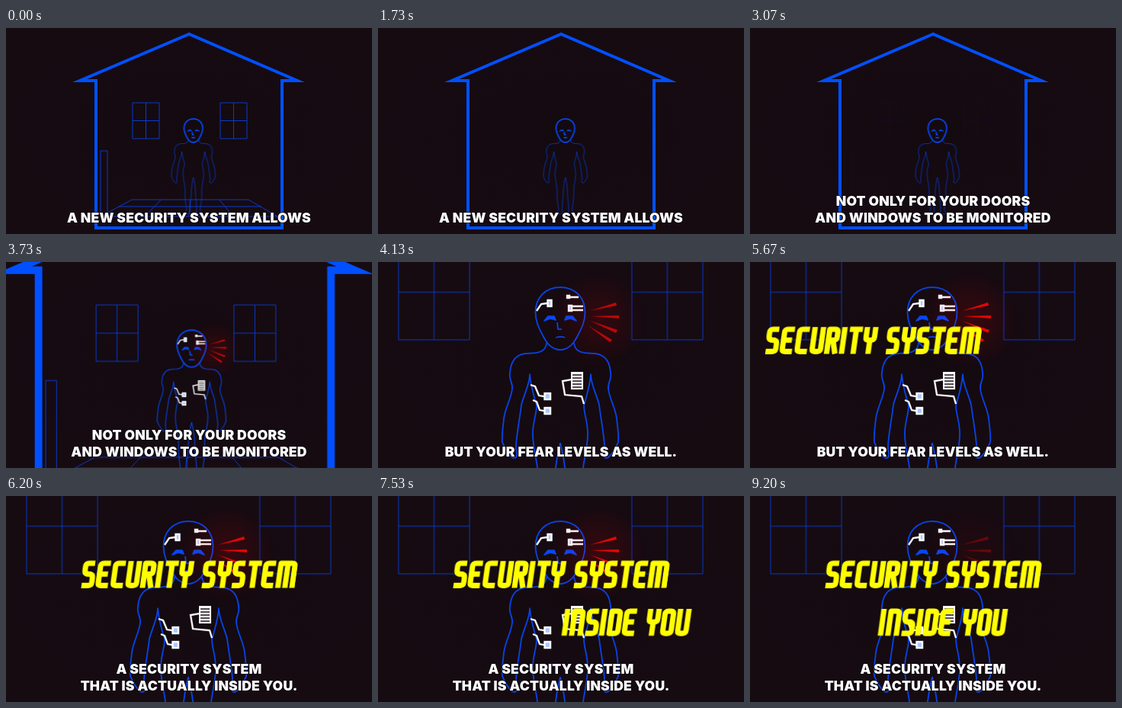
Animation, 480 px wide and 270 px high, one loop 9270 ms. Source, as an HTML page:

```html
<!DOCTYPE html>
<html lang="en">
<head>
<meta charset="utf-8">
<title>Security system</title>
<style>
  html, body { margin: 0; width: 100%; height: 100%; overflow: hidden; background: #160a12; }
  svg { display: block; width: 100%; height: 100%; }
  svg * { transform-origin: 0 0; }
  .line { fill: none; stroke: #0848f4; }
  .line * { vector-effect: non-scaling-stroke; }
  .house { stroke: #0050ff; stroke-width: 4; stroke-miterlimit: 8; }
  .room { stroke: #0a3fd4; stroke-width: .95; }
  .body { stroke-width: 1.75; stroke-linejoin: round; }
  .brow { fill: #0848f4; }
  .wire { fill: none; stroke: #fff; stroke-width: 2.3; }
  .chip { fill: #a9c8ff; stroke: #fff; stroke-width: 2.4; }
  .title { fill: none; stroke: #ff0; stroke-width: 7; stroke-linejoin: round; }
  .caption {
    font: 900 17.6px Inter, sans-serif; letter-spacing: .15px; text-anchor: middle; fill: #fff;
    stroke: #0b070c; stroke-width: 1.4px; paint-order: stroke; stroke-linejoin: round;
  }
</style>
</head>
<body>
<svg viewBox="0 0 480 270">
  <defs>
    <radialGradient id="night">
      <stop offset="0" stop-color="#130a10"/>
      <stop offset="1" stop-color="#170b12"/>
    </radialGradient>
    <radialGradient id="glow">
      <stop offset="0" stop-color="#f00" stop-opacity=".17"/>
      <stop offset="1" stop-color="#f00" stop-opacity="0"/>
    </radialGradient>
    <g id="half">
      <path d="M221 106C220 114 216 118 206 119L192 120C179 122 174 132 173 145C171 153 177 158 176 166C175 178 167 190 165 205C164 216 162 226 163 236C166 243 169 250 176 256C181 259 184 254 181 246C180 235 186 205 188 187C192 172 199 160 199 147C200 162 204 174 208 188C208 200 202 212 203 228C204 250 211 268 210 285C208 310 213 330 216 350C212 358 205 362 210 364C220 366 228 364 228 358C226 335 233 300 232 280C233 262 236 250 239 237"/>
      <path class="brow" d="M218 77L223 71H231L233 76L226 74Z"/>
    </g>
  </defs>

  <rect width="480" height="270" fill="url(#night)"/>

  <g id="scene">
    <path class="line house" d="M240 8L97 69H118V262H362V69H382Z"/>
    <g id="room" class="line room">
      <path id="pane" d="M166 98H201V145H166ZM183.5 98V145M166 121.5H201"/>
      <use href="#pane" x="115"/>
      <path d="M124 161H133V245H124Z"/>
      <path id="floor"/>
    </g>

    <!-- drawn at close-up size -->
    <g transform="scale(.376) translate(414.6 283.7)">
      <g class="line body">
        <path d="M239 33C259 33 271.5 47 271.5 66C271.5 80 265 90 261 98C256 108 248 115 239 115C230 115 222 108 217 98C213 90 206.5 80 206.5 66C206.5 47 219 33 239 33ZM235 79L236 88H241M233 99L237 98H242L245 99"/>
        <use href="#half"/>
        <use href="#half" transform="translate(478) scale(-1 1)"/>
      </g>
      <g id="chips">
        <path class="wire" d="M208 64L214 55L222 54M252 46H263M255 58H269M255 63H269M200 161L206 163L211 175L218 176M203 181L208 183L212 194L218 195M253 154L242 156L245 174L267 176L270 186"/>
        <g class="chip">
          <rect x="222.5" y="50" width="5" height="8"/>
          <rect x="248" y="44" width="3" height="3"/>
          <rect x="250" y="57" width="4" height="7"/>
          <rect x="218.5" y="172" width="7.5" height="8"/>
          <rect x="218.5" y="191" width="7.5" height="8"/>
        </g>
        <path fill="#fff" d="M253 144H269V167H253Z"/>
        <path stroke="#140a11" stroke-width="1.4" d="M255 148H267M255 152H267M255 156H267M255 160H267M255 164H267"/>
      </g>
      <g id="rays">
        <circle cx="288" cy="76" r="66" fill="url(#glow)"/>
        <path fill="#f00808" d="M278 64L312 53L313 57ZM279 71L316 70V74ZM278 77L314 89L312 93ZM275 83L307 102L304 105Z"/>
      </g>
    </g>
  </g>

  <g id="titles"></g>
  <g id="captions"></g>
</svg>

<script>
const LOOP = 9270;
const FULL_ZOOM = 2.66;
const $ = id => document.getElementById(id);
const now = document.timeline.currentTime ?? 0;

function make(tag, attrs, parent) {
  const el = document.createElementNS('http://www.w3.org/2000/svg', tag);
  for (const key in attrs) el.setAttribute(key, attrs[key]);
  return parent.appendChild(el);
}

// steps: [ms, value]; the first and last values hold to the ends of the loop
function track(el, prop, steps, easing = 'linear') {
  const all = [[0, steps[0][1]], ...steps, [LOOP, steps.at(-1)[1]]];
  const frames = all.map(([ms, value]) => ({ offset: ms / LOOP, [prop]: value, easing }));
  el.animate(frames, { duration: LOOP, iterations: Infinity }).startTime = now;
}
const hold = (el, steps) => track(el, 'opacity', steps, 'step-end');

// Perspective floor
let grid = 'M165 225H318M148 234H335M124 247H356';
for (let i = 0; i <= 4; i++) grid += `M${165 + i * 38.25} 225L${124 + i * 58} 247`;
$('floor').setAttribute('d', grid);

// Camera moves forward at constant speed, so scale grows as 1 / distance
function dolly(cx, cy, start, end, count = 16) {
  const steps = [], strokes = [];
  for (let i = 0; i <= count; i++) {
    const u = i / count;
    const ms = start + u * (end - start);
    const scale = 1 / (1 - u * (1 - 1 / FULL_ZOOM));
    steps.push([ms, `translate(${cx * (1 - scale)}px, ${cy * (1 - scale)}px) scale(${scale})`]);
    strokes.push([ms, `${4 * scale}px`]);
  }
  track($('scene'), 'transform', steps);
  track(document.querySelector('.house'), 'strokeWidth', strokes);
}
dolly(249.8, 170.9, 3405, 3965);

// Doors and windows blink
hold($('room'), [[0, 1], [1665, 0], [2065, 1], [2265, 0], [2465, 1],
  [2665, 0], [2865, 1], [3065, .06], [3265, 1]]);

track($('chips'), 'opacity', [[3330, 0], [3470, 1]]);

const PULSE = 667;
const pulse = [[3500, 0]];
for (let ms = 3567; ms < LOOP; ms += PULSE / 10) {
  pulse.push([ms, Math.min(1, .68 + .4 * Math.cos((ms - 4937) / PULSE * 2 * Math.PI))]);
}
track($('rays'), 'opacity', pulse);

// Title lettering: monoline glyphs, 35 high
const GLYPHS = {
  S: 'M15 3H7Q3 3 3 7V12Q3 16 7 17H10Q14 18 14 22V28Q14 32 10 32H1',
  E: 'M16 3H7Q3 3 3 7V28Q3 32 7 32H16M3 17H14',
  C: 'M16 3H7Q3 3 3 7V28Q3 32 7 32H16',
  U: 'M3 0V28Q3 32 7 32H10Q14 32 14 28V0',
  R: 'M3 35V3H10Q14 3 14 7V13Q14 17 10 17H5M9 17L14 35',
  I: 'M3 0V35',
  T: 'M0 3H17M8.5 3V35',
  Y: 'M3 0V13Q3 17 7 17H10Q14 17 14 13V0M8.5 17V35',
  M: 'M3 35V3H17.5Q21.5 3 21.5 7V35M12.2 3V35',
  N: 'M3 35V3H10Q14 3 14 7V35',
  D: 'M3 3H10Q14 3 14 7V28Q14 32 10 32H3Z',
  O: 'M7 3H10Q14 3 14 7V28Q14 32 10 32H7Q3 32 3 28V7Q3 3 7 3Z'
};
const ADVANCE = { I: 9.7, M: 27, ' ': 11 };

function title(text, y, steps) {
  const mover = make('g', { class: 'title', role: 'img', 'aria-label': text }, $('titles'));
  const slant = make('g', { transform: `translate(0 ${y + 35}) skewX(-8) translate(0 -35)` }, mover);
  let x = 0;
  for (const ch of text) {
    if (GLYPHS[ch]) make('path', { d: GLYPHS[ch], transform: `translate(${x})` }, slant);
    x += ADVANCE[ch] ?? 19.6;
  }
  track(mover, 'transform', steps.map(([ms, left]) => [ms, `translateX(${left}px)`]));
}
title('SECURITY SYSTEM', 85.3, [[4900, -292], [5866, 97.5]]);
title('INSIDE YOU', 148, [[6770, 482], [7762, 168]]);

function caption(from, to, ...lines) {
  const group = make('g', { class: 'caption' }, $('captions'));
  lines.forEach((line, i) => {
    const y = 255.3 - (lines.length - 1 - i) * 22.4;
    make('text', { x: 240, y }, group).textContent = line;
  });
  hold(group, [[0, from ? 0 : 1], [from, 1], [to, to < LOOP ? 0 : 1]]);
}
caption(0, 2130, 'A NEW SECURITY SYSTEM ALLOWS');
caption(2130, 4130, 'NOT ONLY FOR YOUR DOORS', 'AND WINDOWS TO BE MONITORED');
caption(4130, 5900, 'BUT YOUR FEAR LEVELS AS WELL.');
caption(5900, LOOP, 'A SECURITY SYSTEM', 'THAT IS ACTUALLY INSIDE YOU.');
</script>
</body>
</html>
```
